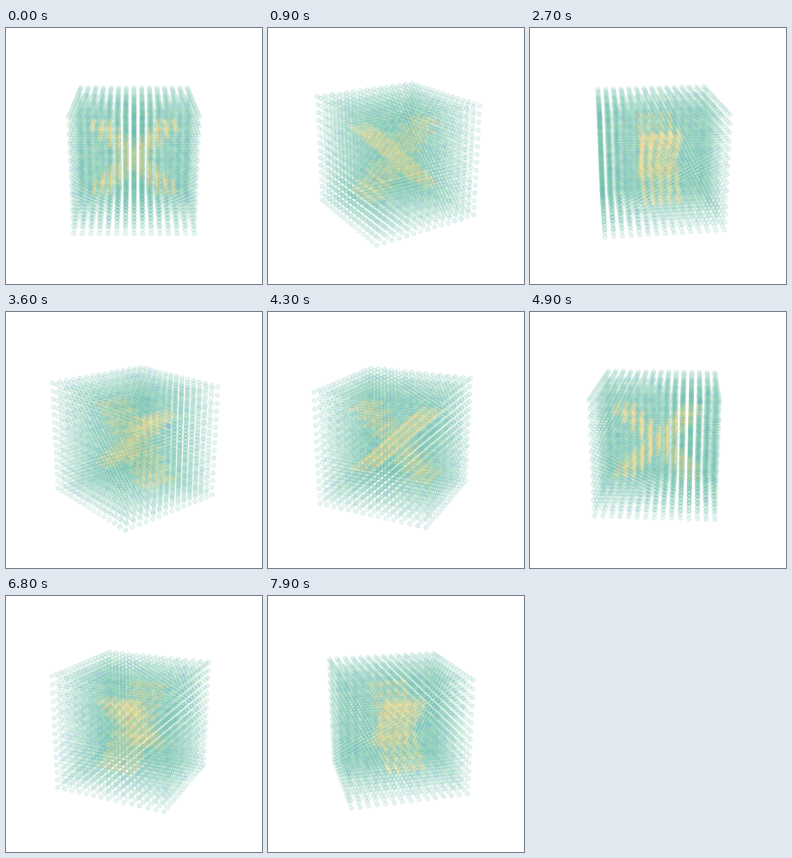
Write a matplotlib script that moves like this. It is 256 px wide and 256 px high and loops after 8 s.

```python
import numpy as np
import matplotlib.pyplot as plt
from matplotlib.animation import FuncAnimation

SIZE, DPI = 256, 64
PX = 72 / DPI
FRAMES, INTERVAL = 80, 100
STEP = np.radians(3.6)
ELEV = np.radians(20)
N, DIST, FOCAL = 15, 4.7, 531.7

rng = np.random.default_rng(4)
grid = np.arange(N) - N // 2
i, j, k = (a.ravel() for a in np.meshgrid(grid, grid, grid, indexing="ij"))
across, toward, up = (a / (N - 1) for a in (i, j, k))

# Pale cube with a brighter X extruded through the middle layers
cross = ((abs(abs(i) - abs(k)) <= 1) & (abs(i) <= 5)
         & (abs(k) <= 4) & (abs(j) <= 2))
value = np.where(cross, rng.normal(0.61, 0.015, i.size),
                 rng.normal(0.2, 0.025, i.size))
base = plt.get_cmap("Spectral_r")(value)
base[:, 3] = np.where(cross, 0.3, 0.15)


def project(angle):
    c, s = np.cos(angle), np.sin(angle)
    x = across * c + toward * s
    h = toward * c - across * s
    depth = h * np.cos(ELEV) + up * np.sin(ELEV)
    y = up * np.cos(ELEV) - h * np.sin(ELEV)
    scale = FOCAL / (DIST - depth)
    return 128 + x * scale, 128.2 - y * scale, depth


fig = plt.figure(figsize=(SIZE / DPI, SIZE / DPI), dpi=DPI, facecolor="white")
ax = fig.add_axes([0, 0, 1, 1])
ax.set(xlim=(0, SIZE), ylim=(SIZE, 0))
ax.axis("off")
dots = ax.scatter(across, up, s=(4.3 * PX) ** 2, linewidths=0.9 * PX)


def update(n):
    x, y, depth = project(n * STEP)
    order = np.argsort(depth, kind="stable")
    dots.set_offsets(np.column_stack([x, y])[order])
    dots.set_facecolor(base[order])
    dots.set_edgecolor(base[order])
    return dots,


anim = FuncAnimation(fig, update, frames=FRAMES, interval=INTERVAL,
                     repeat=True, repeat_delay=0)
plt.show()
```
